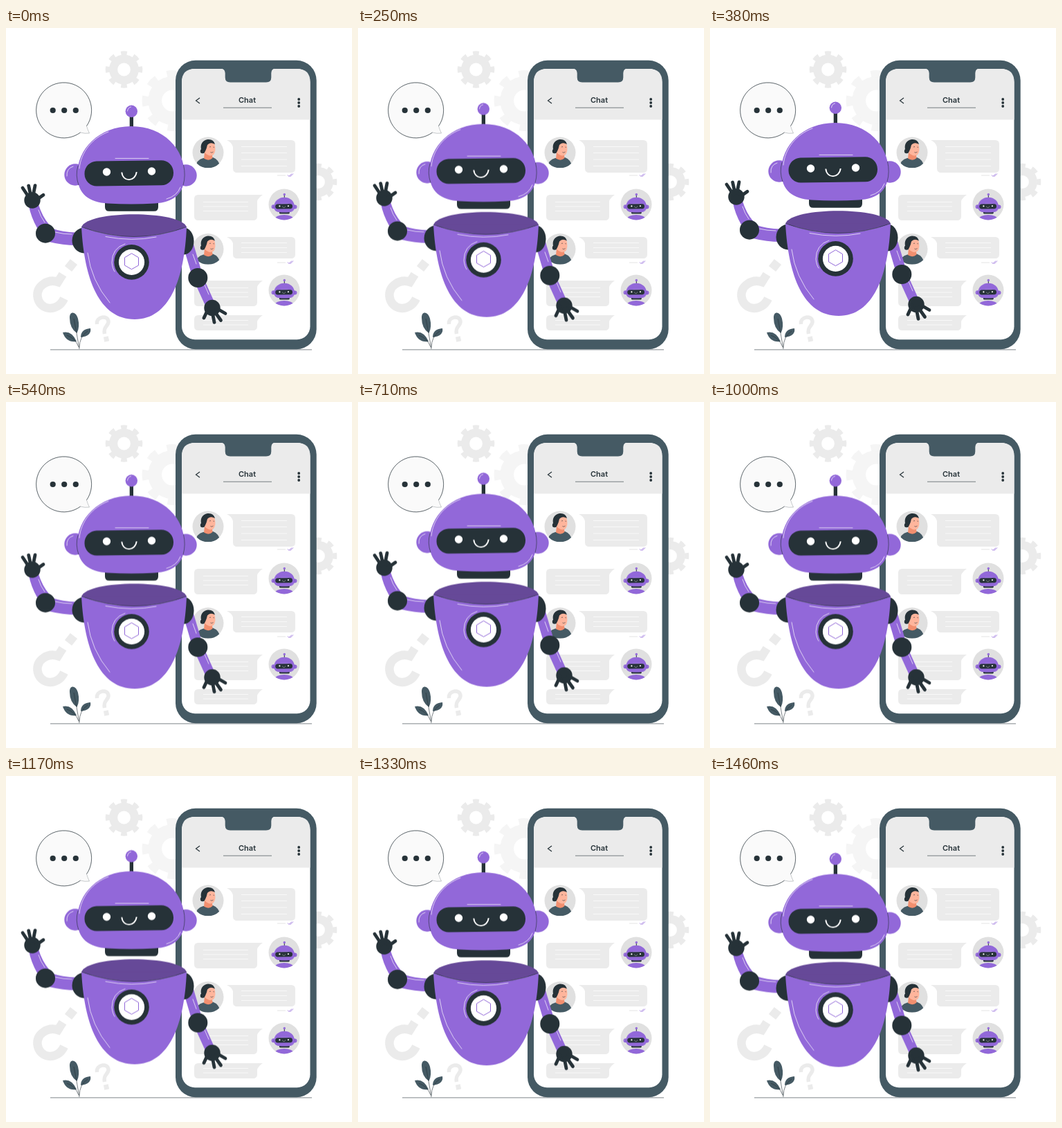
An HTML page without scripts for the animation above (1.5 s loop, 500 by 500 pixels).

```html
<!DOCTYPE html>
<html lang="en">
<head>
<meta charset="utf-8">
<title>Chat robot</title>
<style>
  html, body { margin: 0; width: 100%; height: 100%; overflow: hidden; background: #fff; }
  svg { display: block; width: 100%; height: 100%; }
  .purple { fill: #9268d9; }
  .dark { fill: #263238; }
  .slate { fill: #455a64; }
  .grey { fill: #ebebeb; }
  .white { fill: #fff; }
  .line { fill: none; stroke: #263238; stroke-width: .6; }
  .shine { fill: none; stroke: #fff; stroke-width: .7; stroke-linecap: round; }
  .rule { fill: none; stroke: #fafafa; stroke-width: .9; }
  .limb { fill: none; stroke: #9268d9; }
  .fingers { fill: none; stroke: #263238; stroke-width: 4.8; stroke-linecap: round; }
  .mark { fill: none; stroke: #ebebeb; }
  .title { font: 600 11px Inter, "Open Sans", sans-serif; text-anchor: middle; }
  .robot { animation: float 1.5s steps(18) infinite; }
  @keyframes float {
    0%, 100% { transform: translateY(0); }
    50% { transform: translateY(-10px); }
  }
</style>
</head>
<body>
<svg viewBox="0 0 500 500">
  <defs>
    <g id="gear" fill="none" stroke="currentColor">
      <circle r="15.4" stroke-width="12"/>
      <circle r="23.5" stroke-width="6.6" pathLength="16" stroke-dasharray=".95 1.05" stroke-dashoffset=".475"/>
    </g>

    <g id="head">
      <path class="dark" d="M143 250H220V258.700Q220 264.700 214 264.700H149Q143 264.700 143 258.700Z"/>
      <path class="dark" d="M178.700 126H184V145H178.700Z"/>
      <circle class="purple" cx="181.300" cy="120.300" r="8.700"/>
      <path class="shine" d="M175.500 120Q176 115 180.500 114"/>
      <circle class="purple" cx="100" cy="212" r="15.700"/>
      <circle class="purple" cx="260" cy="213" r="15.700"/>
      <path class="shine" d="M88 214Q87 203 97 200"/>
      <path class="purple" d="M181 142C228 142 258 175 258 212C258 240 242 252 215 253.500Q181 255.500 147 253.500C120 252 103 240 103 212C103 175 134 142 181 142Z"/>
      <path class="line" d="M104 199Q100 213 105 227M256.500 198Q260 213 256 227"/>
      <path class="shine" d="M106 203C108 180 124 159 148 150M158 188.400H206M232 247Q247 243 252 230"/>
      <rect class="dark" x="113.500" y="191.900" width="128.500" height="36" rx="17.500" transform="rotate(-.7 178 210)"/>
      <circle class="white" cx="145.500" cy="208" r="5.700"/>
      <circle class="white" cx="210.500" cy="207" r="5.700"/>
      <path d="M167.300 208.500C168.500 223 187 222.500 188.700 208" fill="none" stroke="#fff" stroke-width="1.900"/>
    </g>

    <clipPath id="disc"><circle r="22.500"/></clipPath>

    <g id="bot">
      <circle r="22.500" fill="#e0e0e0"/>
      <g clip-path="url(#disc)">
        <ellipse class="purple" cy="21" rx="13.500" ry="6"/>
        <use href="#head" transform="translate(-34.700 -37.700) scale(.193)"/>
      </g>
    </g>

    <g id="woman">
      <circle r="22.500" fill="#e0e0e0"/>
      <g clip-path="url(#disc)">
        <path class="slate" d="M-18 22Q-17 10-7 8L7 7Q16 10 18 22Z"/>
        <path fill="#f28f6f" d="M-5-1L6 3L6.500 8Q1 13-6 8.500Z"/>
        <path fill="#ffb59c" d="M-5-13Q4-19 9.500-12Q12-2 8 3Q2 7-5 0Z"/>
        <path class="dark" d="M-9-2C-13-12-7-19 1-19Q8-19 10-12Q3-16-1-11Q-2-6-4-2L-6 1Z"/>
        <circle class="dark" cx="-8" cy="-2" r="3.200"/>
        <path class="line" d="M2-8L4-8.500M7.500-8L9-7.500M3.500-.5Q5.500 1 7.500-1"/>
      </g>
    </g>

    <g id="receipt" fill="none" stroke-width=".8">
      <path d="M392 .5H404" stroke="#ddd"/>
      <path d="M407 0L409 2L413-2M410 1L411 2L415-2" stroke="#9268d9"/>
    </g>
  </defs>

  <!-- Background -->
  <use href="#gear" color="#ebebeb" x="170.500" y="60"/>
  <use href="#gear" color="#f5f5f5" transform="translate(240.500 105) scale(1.640)"/>
  <use href="#gear" color="#ebebeb" x="451.500" y="222.500"/>
  <path class="mark" stroke-width="12.500" d="M82 356L75 367C60 362 44 373 45.500 388C48 408 74 412 84 391"/>
  <rect class="grey" x="-6.500" y="-6.500" width="13" height="13" transform="translate(94 343) rotate(38)"/>
  <path class="mark" stroke-width="5.500" d="M131.500 428C130 417 147 414 148 424C148.500 431 140 431 142.500 442"/>
  <rect class="grey" x="-3.500" y="-3.500" width="7" height="7" transform="translate(145 449.500) rotate(-12)"/>

  <path class="line" d="M64 464.900H442"/>

  <!-- Plant -->
  <g class="slate">
    <path d="M92 419C91.500 409 101 409 104 420Q107 432 102.500 441Q92 434 92 419Z"/>
    <path d="M82 440Q95 437 102 453Q87 455 82 440Z"/>
    <path d="M108 447Q108 435 122 434Q124 445 108 447Z"/>
    <path class="line" d="M98 420Q102 440 106 464M88 444Q100 448 105 461M118 438Q106 446 106 462"/>
  </g>

  <!-- Speech bubble -->
  <path d="M116.500 141.700A40 40 0 1 0 107.500 151Q114 153 120.500 152Q118 147 116.500 141.700Z" fill="#fafafa" stroke="#263238" stroke-width=".25"/>
  <path class="line" d="M116.500 141.700A40 40 0 1 0 107.500 151"/>
  <g class="dark">
    <circle cx="67.700" cy="119" r="4.100"/>
    <circle cx="84.200" cy="119" r="4.100"/>
    <circle cx="100.800" cy="119" r="4.100"/>
  </g>

  <!-- Phone -->
  <rect class="slate" x="245" y="46.800" width="203.700" height="417.400" rx="29"/>
  <rect class="white" x="254" y="59" width="185.500" height="391.300" rx="19"/>
  <path class="grey" d="M254 132.500V78Q254 59 273 59H420.500Q439.500 59 439.500 78V132.500Z"/>
  <path class="slate" d="M309 58Q316.700 59 316.700 65V71.500Q316.700 78.500 324 78.500H376Q383.300 78.500 383.300 71.500V65Q383.300 59 390 58Z"/>
  <path class="line" d="M280 101L274.500 105L280 109" style="stroke-width:1.200"/>
  <text class="title dark" x="348.500" y="108.300">Chat</text>
  <path class="line" d="M314 115.200H384"/>
  <g class="dark">
    <circle cx="423.200" cy="103" r="1.900"/>
    <circle cx="423.200" cy="108" r="1.900"/>
    <circle cx="423.200" cy="113" r="1.900"/>
  </g>

  <!-- Messages -->
  <g class="grey">
    <path d="M319 162H412q6 0 6 6V203q0 6-6 6H334q-6 0-6-6V172Q326 165 319 162Z"/>
    <path d="M371 241H278q-6 0-6 6V272q0 6 6 6H357q6 0 6-6V250Q365 245 371 241Z"/>
    <path d="M319 302H412q6 0 6 6V327q0 6-6 6H334q-6 0-6-6V311Q326 305 319 302Z"/>
    <path d="M371 365H278q-6 0-6 6V396q0 6 6 6H357q6 0 6-6V374Q365 369 371 365Z"/>
    <path d="M371 415H278q-6 0-6 6V431q0 6 6 6H357q6 0 6-6V424Q365 419 371 415Z"/>
  </g>
  <path class="rule" d="M340 171.500h66m-66 9h66m-66 9.500h66m-66 9.500h66M340 310.500h66m-66 7h66m-66 7h66"/>
  <path class="rule" d="M285 251.500h65m-65 6.500h65m-65 6.500h65M285 375.500h65m-65 6.500h65m-65 6.500h65M285 422.500h65m-65 6.500h65"/>
  <use href="#receipt" y="212.500"/>
  <use href="#receipt" y="338.500"/>
  <use href="#woman" x="292" y="180"/>
  <use href="#woman" x="292" y="319.500"/>
  <use href="#bot" x="402" y="255"/>
  <use href="#bot" x="402" y="379"/>

  <!-- Robot -->
  <g class="robot">
    <path class="purple" d="M64 289Q82 295 102 295.500V314Q82 314 62 309Z"/>
    <path class="purple" d="M33 257L47 255Q52 272 63 285L45 289Q36 273 33 257Z"/>
    <path class="shine" d="M71 295Q83 298 95 298M47 263Q50 273 56 281"/>
    <circle class="dark" cx="57" cy="296.700" r="14"/>
    <circle class="dark" cx="38" cy="249" r="11.700"/>
    <path class="fingers" d="M34 246L24 231M36 243L32.700 228M39 243L42 227.700M43 249L54 241.300"/>

    <path class="limb" stroke-width="15" d="M263 312L277.500 361"/>
    <path class="limb" stroke-width="14" d="M277.500 361L297 404"/>
    <ellipse class="dark" cx="113" cy="307" rx="17.500" ry="18.500"/>
    <ellipse class="dark" cx="257" cy="308" rx="14.500" ry="19.500"/>
    <path class="shine" d="M270 327L275 341M286 369L293 385"/>
    <circle class="dark" cx="277.300" cy="361" r="14"/>
    <circle class="dark" cx="298" cy="404.500" r="11.700"/>
    <path class="fingers" d="M292 406L286 419M298 410L301 425.300M301 409L310.500 422.500M304 405L317 412.500"/>

    <path d="M109 287.500C118 263 252 263 261 287.500L185 305Z" fill="#664998"/>
    <path class="purple" d="M109 287.500C113 363 135 421 186 421C236 421 258 363 261 287.500Q185 315.500 109 287.500Z"/>
    <path fill="#664998" d="M109 287.500Q185 315.500 261 287.500Z"/>
    <path class="line" d="M109 287.500Q185 315.500 261 287.500"/>
    <path class="shine" d="M144 301.500Q182 309 217 302M118 325Q123 365 150 397M172 312Q153 318 153 339Q154 348 157 352"/>
    <circle class="dark" cx="181.500" cy="338.400" r="25.300"/>
    <circle class="white" cx="181.500" cy="338.400" r="18.600"/>
    <path d="M181.500 325.700L191.500 331.700V343L181.500 348.700L171.500 343V331.700Z" fill="none" stroke="#9268d9"/>

    <use href="#head"/>
  </g>
</svg>
</body>
</html>
```
